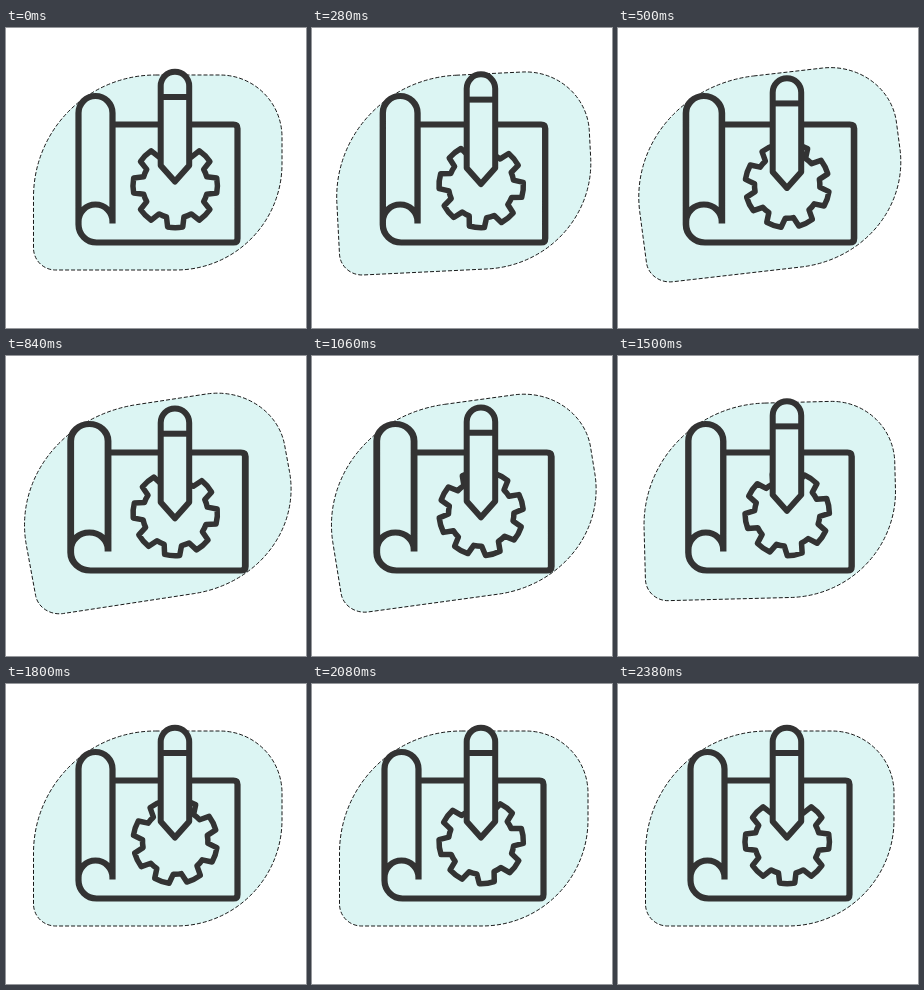
An HTML page with a canvas for the animation above (2420 ms loop, 300x300 px).

```html
<!DOCTYPE html>
<html lang="en">
<head>
<meta charset="utf-8">
<title>Blueprint icon</title>
<style>
  html, body { margin: 0; width: 100%; height: 100%; overflow: hidden; background: #fff; }
  canvas { display: block; width: 300px; height: 300px; }
</style>
</head>
<body>
<canvas id="stage" width="300" height="300"></canvas>
<script>
const ctx = document.getElementById('stage').getContext('2d');
const LOOP = 2420, INK = '#333', MINT = '#dcf5f3';

const clamp = x => Math.min(1, Math.max(0, x));
const ease = x => (1 - Math.cos(Math.PI * clamp(x))) / 2;
// Rises from 0 to 1 by `peak`, stays until `fall`, is back at 0 by `end`.
const swell = (t, peak, fall, end) => ease(t / peak) - ease((t - fall) / (end - fall));

const paper = new Path2D(`
  M106.5 195.5V85a17 17 0 0 0-34 0V196.5a18 18 0 0 0 18 18H227.5q4 0 4-4V100.5q0-4-4-4H106.5
  M72.5 193.5a17 17 0 0 1 34 0`);
const pencil = new Path2D('M154.7 58a14.25 14.25 0 0 1 28.5 0V137.5L168.95 153.5L154.7 137.5Z');
const pencilBand = new Path2D('M154.7 69H183.2');
const gear = gearPath(8, 32.7, 42.2);

function gearPath(teeth, root, tip) {
  const path = new Path2D(), step = 2 * Math.PI / teeth;
  const rootHalf = 0.27, tipHalf = 0.18;
  for (let i = 0; i < teeth; i++) {
    const a = i * step;
    path.arc(0, 0, tip, a - tipHalf, a + tipHalf);
    path.arc(0, 0, root, a + rootHalf, a + step - rootHalf);
  }
  path.closePath();
  return path;
}

function withTransform(draw) {
  ctx.save();
  draw();
  ctx.restore();
}

function drawBlob(p) {
  withTransform(() => {
    ctx.save();
    ctx.translate(151.5 - 1.3 * p, 144.5);
    ctx.scale(1 + 0.098 * p, 1);
    ctx.rotate(-9.5 * p * Math.PI / 180);
    ctx.beginPath();
    ctx.roundRect(-124, -97.5, 248.5, 195, [122, 62, 106, 22]);
    ctx.restore();
    ctx.fillStyle = MINT;
    ctx.fill();
    ctx.strokeStyle = '#000';
    ctx.lineWidth = 0.9;
    ctx.setLineDash([4, 2]);
    ctx.stroke();
  });
}

function draw(t) {
  const sway = swell(t, 760, 880, 1720);
  const stretch = swell(t, 920, 980, 1780);

  ctx.clearRect(0, 0, 300, 300);
  drawBlob(sway);

  ctx.strokeStyle = INK;
  ctx.fillStyle = MINT;
  ctx.lineWidth = 6.2;
  ctx.lineJoin = 'round';

  withTransform(() => {
    ctx.translate(152, 0);
    ctx.scale(1 + 0.1 * stretch, 1);
    ctx.translate(-152, 0);
    ctx.stroke(paper);
  });

  withTransform(() => {
    ctx.translate(169.2, 157.5);
    ctx.rotate(Math.PI * ease(t / 2400));
    ctx.lineWidth = 5.5;
    ctx.stroke(gear);
  });

  withTransform(() => {
    ctx.translate(0, 8.7 * sway);
    ctx.fill(pencil);
    ctx.lineWidth = 6;
    ctx.stroke(pencil);
    ctx.stroke(pencilBand);
  });
}

function tick() {
  draw(performance.now() % LOOP);
  requestAnimationFrame(tick);
}
tick();
</script>
</body>
</html>
```
